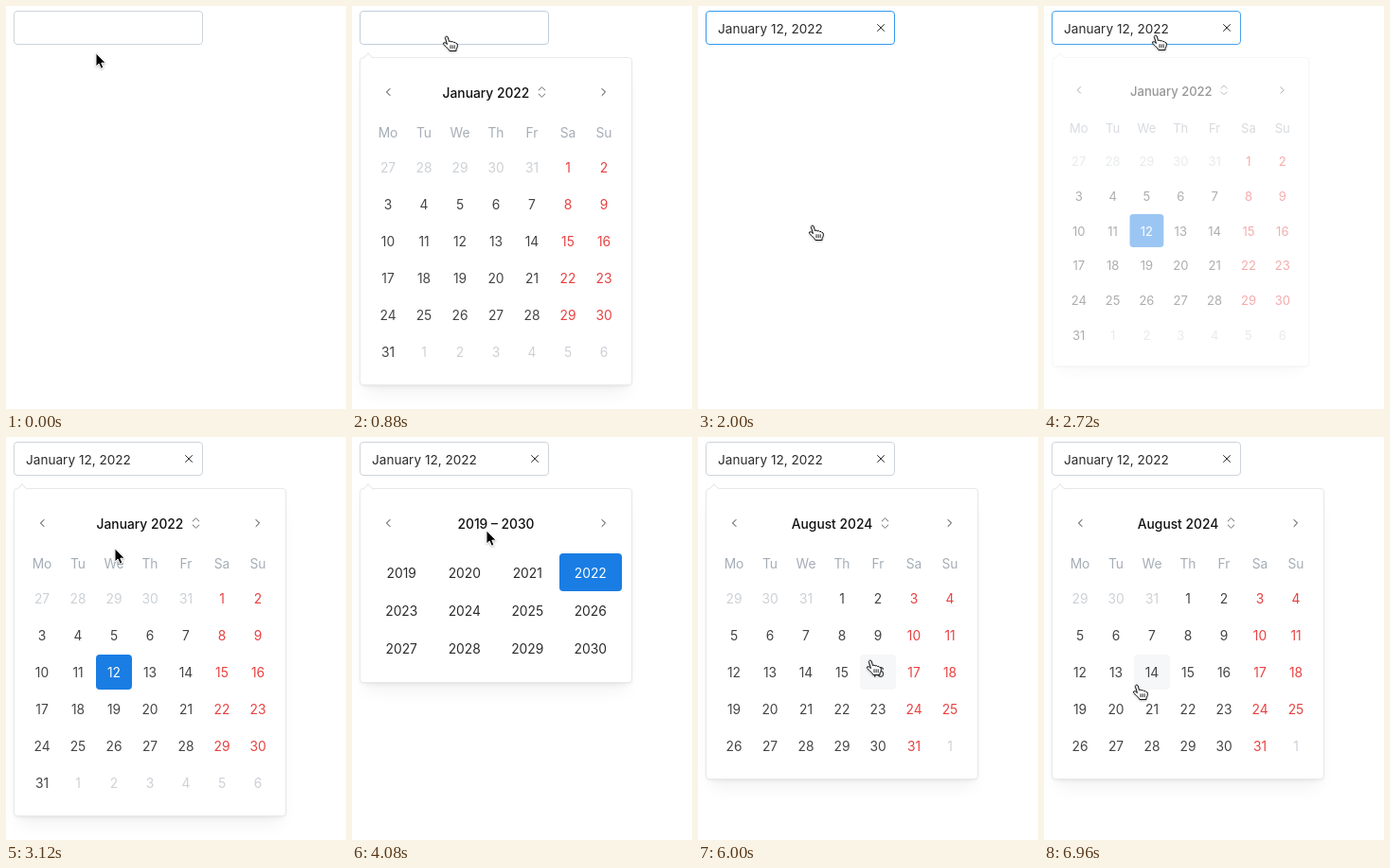
Recreate the animation shown at these times as an HTML page. Size 359 px wide and 426 px high, loop 7.04 s.

```html
<!DOCTYPE html>
<html lang="en">
<head>
<meta charset="utf-8">
<title>Date picker</title>
<style>
  html, body { margin: 0; width: 100%; height: 100%; overflow: hidden; background: #fff; }
  body { position: relative; font: 13.8px/20px Inter, "Liberation Sans", sans-serif; color: #2b2b2b; }
  div, svg { position: absolute; box-sizing: border-box; }
  svg { fill: none; stroke: #333; stroke-linecap: round; stroke-linejoin: round; overflow: visible; }
  .input { left: 8px; top: 5px; width: 200px; height: 36px; border: 1px solid; border-radius: 4px; }
  .value { left: 21px; top: 14px; font-size: 13.6px; white-space: pre; }
  .pop { inset: 0; transform-origin: 16px 54px; }
  .card { left: 8px; top: 54px; width: 288px; border: 1px solid #e6e9ec; border-radius: 4px; background: #fff;
    box-shadow: 0 1px 3px rgba(0,0,0,.05), 0 14px 18px -6px rgba(0,0,0,.05), 0 7px 7px -5px rgba(0,0,0,.04); }
  .tip { left: 13px; top: 51px; width: 8px; height: 8px; transform: rotate(45deg); background: #fff;
    border: solid #e6e9ec; border-width: 1px 0 0 1px; }
  .cell, .title { display: flex; align-items: center; justify-content: center; white-space: pre; border-radius: 4px; }
  .title { left: 57px; top: 73px; width: 190px; height: 37px; font-weight: 500; color: #111; }
  .title svg { position: static; margin-left: 6px; stroke: #666; }
  .day { padding-top: 1px; color: #444; }
  .slot { padding-top: 2px; }
  .week { color: #a5adb6; }
  .red { color: #e84040; }
  .out { color: #ccd1d6; }
  .hover { background: #f5f7f9; }
  .on { background: #1a7de4; color: #fff; }
  .cursor { left: 0; top: 0; filter: drop-shadow(0 1px 1px rgba(0,0,0,.25)); }
</style>
</head>
<body>
<div class="input"></div>
<div class="value">January 12, 2022</div>
<svg class="clear" width="359" height="426"><path d="M189.5 19.5l7 7m0-7l-7 7"/></svg>
<div class="pop">
  <div class="card"></div>
  <div class="tip"></div>
  <svg width="359" height="426"><path d="M40 87.5l-3.5 3.5 3.5 3.5M264 87.5l3.5 3.5-3.5 3.5"/></svg>
</div>
<svg class="cursor" width="18" height="19">
  <path class="arrow" fill="#000" stroke="#fff" d="M0 0v14l3.2-2.9 2.1 5.1 2.6-1.1-2.1-4.9H10z"/>
  <g class="hand" transform="translate(-4.5 -1.5)" stroke="#111">
    <path fill="#fff" d="M3 2.5q1-2.4 2.7-.2l1.2 4.7q2-1 2.5.4 2-.7 2.5.6 2-.4 2.4 1 1.6 0 1.6 1.6 0 3-1.4 4.6V17h-7q-1-2.2-4-4.8L1 9.8Q.5 7.6 3 8.4l1.7 1.4z"/>
    <path stroke-width=".9" d="M8.5 11.2v3m2.1-3v3m2.1-3v3"/>
  </g>
</svg>
<script>
const LOOP = 7040, TICK = 80;
const $ = s => document.querySelector(s);
const pop = $('.pop'), card = $('.card'), field = $('.input'), cursor = $('.cursor');
const show = (el, on) => { el.style.display = on ? '' : 'none'; };

function add(parent, cls, text, x, y, w, h) {
  const el = document.createElement('div');
  el.className = cls;
  el.textContent = text;
  Object.assign(el.style, { left: x + 'px', top: y + 'px', width: w + 'px', height: h + 'px' });
  parent.append(el);
  return { el, x, y, w, h };
}

function makeView(title, height, zoomable) {
  const root = document.createElement('div');
  pop.append(root);
  const head = add(root, 'title', title, 57, 73, 190, 37);
  if (zoomable) head.el.insertAdjacentHTML('beforeend',
    '<svg width="15" height="15"><path d="M4.2 5l3.3-3.2L10.8 5m-6.6 4l3.3 3.2L10.8 9"/></svg>');
  return { root, height, hot: zoomable ? [head] : [] };
}

function dayView(title, year, month) {
  const offset = (new Date(year, month, 1).getDay() + 6) % 7;
  const rows = Math.ceil((offset + new Date(year, month + 1, 0).getDate()) / 7);
  const view = makeView(title, 113 + 39 * rows, true);
  'Mo Tu We Th Fr Sa Su'.split(' ').forEach((d, i) => add(view.root, 'cell week', d, 19 + 38 * i, 115, 38, 38));
  for (let i = 0; i < rows * 7; i++) {
    const date = new Date(year, month, 1 - offset + i), col = i % 7;
    const tone = date.getMonth() !== month ? ' out' : col > 4 ? ' red' : '';
    const cell = add(view.root, 'cell day' + tone, date.getDate(), 19 + 38 * col, 152 + 39 * (i / 7 | 0), 38, 37);
    cell.pick = date.getTime() === new Date(2022, 0, 12).getTime();
    view.hot.push(cell);
  }
  return view;
}

function gridView(title, labels, cols, picked, zoomable) {
  const view = makeView(title, 86 + 40 * labels.length / cols, zoomable), w = 266 / cols;
  labels.forEach((label, i) => {
    const cell = add(view.root, 'cell slot', label, 19 + w * (i % cols), 123 + 40 * (i / cols | 0), w, 40);
    cell.pick = i === picked;
    view.hot.push(cell);
  });
  return view;
}

const months = 'Jan Feb Mar Apr May Jun Jul Aug Sep Oct Nov Dec'.split(' ');
const jan = dayView('January 2022', 2022, 0);
const months22 = gridView('2022', months, 3, 0, true);
const decade = gridView('2019 – 2030', months.map((m, i) => 2019 + i), 4, 3, false);
const months24 = gridView('2024', months, 3, -1, true);
const aug = dayView('August 2024', 2024, 7);
const views = [jan, months22, decade, months24, aug];

const schedule = [[0, null], [520, jan], [2040, null], [2600, jan], [3600, months22],
  [4080, decade], [4860, months24], [5680, aug]];

// Each trip: start, end, destination x and y, sideways swing
const trips = [
  [0, 160, 100, 32, 0],
  [900, 1120, 112, 132, 0],
  [1120, 1840, 121, 232, 130],
  [2040, 2560, 118, 31, 0],
  [2840, 3120, 115, 118, 0],
  [3160, 3920, 142, 99, 0],
  [4120, 4760, 121, 196, 20],
  [5160, 5520, 152, 213, 0],
  [5760, 6960, 98, 262, 110]
];

function ramp(t, a, b) {
  const u = Math.max(0, Math.min(1, (t - a) / (b - a)));
  return u * u * (3 - 2 * u);
}

function pointer(t) {
  let x = 95, y = 50;
  for (const [from, to, tx, ty, swing] of trips) {
    const u = ramp(t, from, to), bow = swing * Math.sin(Math.PI * u);
    x += (tx - x) * u + bow;
    y += (ty - y) * u + bow / 2;
  }
  return [x, y];
}

function draw(t) {
  const [x, y] = pointer(t);
  const inside = b => x >= b.x && x < b.x + b.w && y >= b.y && y < b.y + b.h;
  const view = schedule.filter(s => s[0] <= t).pop()[1];
  const chosen = t >= 1920;

  const open = t < 2040 ? ramp(t, 520, 740) * (1 - ramp(t, 1880, 1980)) : ramp(t, 2620, 2840);
  pop.style.opacity = open;
  pop.style.transform = open < 1 ? `scale(${.9 + .1 * open})` : 'none';
  for (const v of views) show(v.root, v === view);

  const target = view && view.hot.find(inside);
  if (view) {
    card.style.height = view.height + 'px';
    for (const cell of view.hot) {
      const on = !!cell.pick && t > 2040;
      cell.el.classList.toggle('on', on);
      cell.el.classList.toggle('hover', cell === target && !on);
    }
  }

  const focus = t < 1900 ? ramp(t, 430, 560) * (1 - ramp(t, 700, 920)) : 1 - ramp(t, 2660, 2920);
  field.style.borderColor = `color-mix(in srgb, #339af0 ${focus * 100}%, #ced4da)`;
  show($('.value'), chosen);
  show($('.clear'), chosen);

  const hand = target || inside({ x: 8, y: 5, w: 200, h: 36 });
  show($('.hand'), hand);
  show($('.arrow'), !hand);
  cursor.style.transform = `translate(${Math.round(x)}px, ${Math.round(y)}px)`;
}

const start = performance.now();
function loop() {
  const t = (performance.now() - start) % LOOP;
  draw(Math.floor(t / TICK) * TICK);
  requestAnimationFrame(loop);
}
loop();
</script>
</body>
</html>
```
